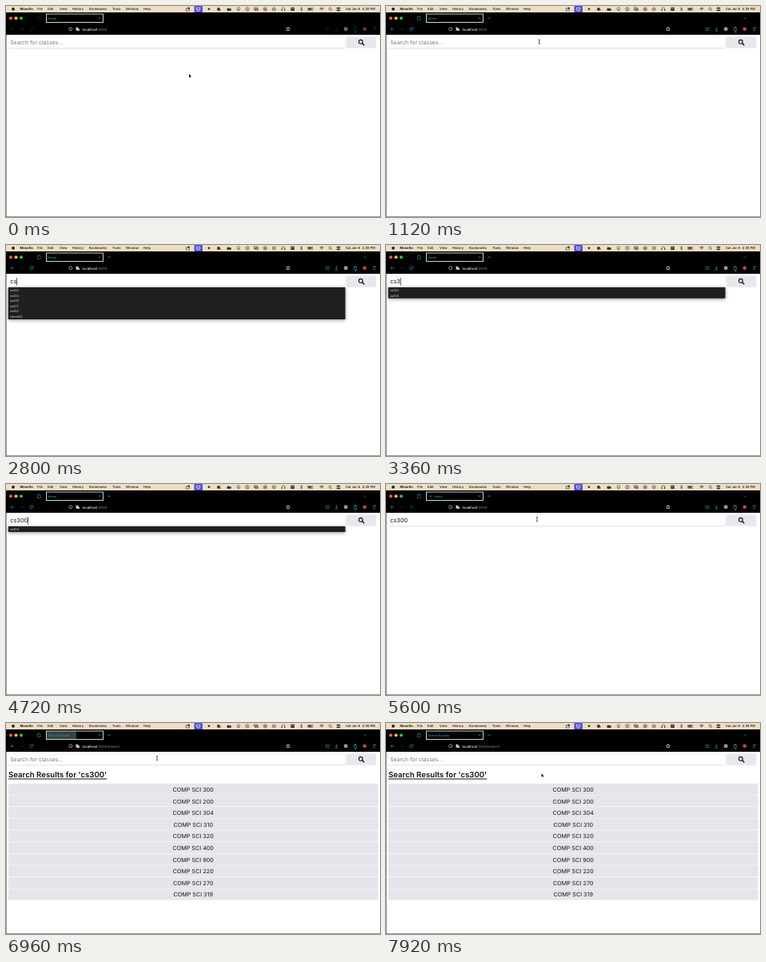
Recreate the animation shown at these times as an HTML page with a canvas. Size 468x264 px, loop 8000 ms.

```html
<!DOCTYPE html>
<html lang="en">
<head>
<meta charset="utf-8">
<title>Class search</title>
<style>
html, body { margin: 0; width: 100%; height: 100%; overflow: hidden; background: #fff; }
canvas { display: block; width: 468px; height: 264px; }
</style>
</head>
<body>
<canvas id="stage"></canvas>
<script>
const W = 468, H = 264, LOOP = 8000, STEP = 80;
const FONT = 'Inter, "Open Sans", sans-serif';
const canvas = document.getElementById('stage');
const scale = window.devicePixelRatio || 1;
canvas.width = W * scale;
canvas.height = H * scale;
const c = canvas.getContext('2d');
c.scale(scale, scale);
c.textRendering = 'geometricPrecision';

const MENUS = [['File', 39], ['Edit', 52], ['View', 67], ['History', 83], ['Bookmarks', 104],
  ['Tools', 133], ['Window', 150], ['Help', 172]];
const COURSES = [300, 200, 304, 310, 320, 400, 900, 220, 270, 319];
const HINTS = ['cs320', 'cs300', 'cs400', 'cs577', 'cs252', 'chem103'];
const QUERY = 'cs300';
const KEYS = [2400, 2800, 3280, 3760, 4000];
const CARET = [1280, 1840, 2400, 3040, 3280, 3600, 3760, 4160, 4720, 5280, 5840];
const ACTIVE = 720, SUBMIT = 5440, COMMIT = 6720, RESULTS = 6960;

// [time, x, y] of the pointer hot spot
const PATH = [[0, 229, 85], [80, 228, 83], [880, 197, 46], [1280, 189, 44], [4720, 189, 44],
  [5040, 190, 56], [5200, 190, 56], [5520, 189, 44], [7760, 189, 44], [7920, 194.6, 63.2], [8000, 194.6, 63.2]];

const passed = (list, t) => list.filter(v => t >= v).length;

function rect(x, y, w, h, fill, r = 0) {
  c.fillStyle = fill;
  c.beginPath();
  c.roundRect(x, y, w, h, r);
  c.fill();
}

function dot(x, y, r, fill) {
  c.fillStyle = fill;
  c.beginPath();
  c.arc(x, y, r, 0, Math.PI * 2);
  c.fill();
}

function ring(x, y, r, color, lw = 0.6) {
  c.strokeStyle = color;
  c.lineWidth = lw;
  c.beginPath();
  c.arc(x, y, r, 0, Math.PI * 2);
  c.stroke();
}

function line(color, lw, ...pts) {
  c.strokeStyle = color;
  c.lineWidth = lw;
  c.beginPath();
  for (let i = 0; i < pts.length; i += 2) c.lineTo(pts[i], pts[i + 1]);
  c.stroke();
}

function frame(x, y, w, h, color, lw = 0.6) {
  c.strokeStyle = color;
  c.lineWidth = lw;
  c.strokeRect(x, y, w, h);
}

function cross(x, y, r, color, lw = 0.6) {
  line(color, lw, x - r, y - r, x + r, y + r);
  line(color, lw, x + r, y - r, x - r, y + r);
}

function text(str, x, y, size, color, weight = 400, align = 'left') {
  c.font = `${weight} ${size}px ${FONT}`;
  c.fillStyle = color;
  c.textAlign = align;
  c.textBaseline = 'alphabetic';
  c.fillText(str, x, y);
  return c.measureText(str).width;
}

function menuBar() {
  const ink = '#3a3228';
  rect(0, 0, W, 8, '#eedec5');
  dot(9, 3.8, 1.9, '#1c1813');
  text('Mossfin', 17.5, 5.2, 4.1, '#1c1813', 700);
  MENUS.forEach(([name, x]) => text(name, x, 5.2, 4.1, '#1c1813', 500));

  rect(235.5, 0, 10.5, 8, '#5a4fd6', 1);
  frame(238.6, 2.2, 4.2, 2.8, '#fff');
  line('#fff', 0.6, 239.5, 6.2, 242, 6.2);

  frame(225.2, 3, 4, 3, ink);
  dot(228.6, 2.7, 1.3, ink);
  rect(252.6, 2.4, 2.8, 2.8, ink, 1.4);
  dot(266, 4, 2, ink);
  dot(268, 5, 1, '#c4553c');
  dot(278.2, 4.4, 1.8, ink);
  dot(280.4, 4.6, 1.5, ink);
  ring(291, 3.6, 1.8, ink);
  line(ink, 0.6, 291, 4, 291, 6.4);
  ring(302, 3.9, 2.2, ink);
  line(ink, 0.7, 302, 2.6, 302, 5.2);
  frame(310.6, 2, 3.6, 2.6, ink);
  frame(312, 3.2, 3.6, 2.6, ink);
  ring(324.3, 3.9, 2.2, ink);
  dot(324.3, 3.9, 1, ink);
  ring(335.3, 3.9, 2, ink);
  line(ink, 0.6, 333.6, 3.9, 337, 3.9);
  c.strokeStyle = ink;
  c.beginPath();
  c.arc(347, 4, 2, Math.PI, 0);
  c.stroke();
  rect(344.6, 4, 1.2, 2, ink);
  rect(348.2, 4, 1.2, 2, ink);
  rect(356.3, 1.8, 4.6, 4.2, ink, 0.6);
  line('#eedec5', 0.5, 357, 3.4, 360.2, 3.4);
  line(ink, 0.5, 368.2, 2.8, 371, 5, 369.6, 6.2, 369.6, 1.6, 371, 2.8, 368.2, 5);
  frame(377.8, 2.5, 6, 2.8, ink, 0.5);
  rect(378.3, 3, 4, 1.8, ink);
  c.lineWidth = 0.7;
  for (const r of [1.2, 2.4, 3.6]) {
    c.beginPath();
    c.arc(395, 5.8, r, -Math.PI * 0.75, -Math.PI * 0.25);
    c.stroke();
  }
  ring(405.5, 3.5, 1.5, ink);
  line(ink, 0.7, 406.6, 4.6, 408, 6);
  rect(413.6, 1.8, 4.8, 1.8, ink, 0.9);
  rect(413.6, 4.4, 4.8, 1.8, ink, 0.9);
  text('Sat Jan 6', 425, 5.2, 4.1, '#1c1813', 500);
  text('4:38 PM', 462, 5.2, 4.1, '#1c1813', 500, 'right');
}

function tabStrip(t) {
  const active = t >= ACTIVE;
  const teal = active ? '#1f8f8c' : '#0b2626';
  const loading = t >= SUBMIT && t < RESULTS;
  ['#ff5f57', '#febc2e', '#28c840'].forEach((color, i) => dot(6 + i * 6.5, 15.3, 2, color));

  frame(39.3, 13.8, 3.8, 3.6, teal);
  line(teal, 0.6, 40, 13.6, 41.2, 12.4, 42.4, 13.6);

  // a short flash sweeps the tab once loading ends
  const flash = (t - RESULTS) / 320;
  if (flash >= 0 && flash < 1) {
    c.globalAlpha = 0.55 * (1 - flash);
    rect(51, 10.5, Math.min(70, 37 + flash * 80), 9.5, '#68767b');
    c.globalAlpha = 1;
  }
  frame(50.5, 10, 71, 10.5, '#e4e8e8', 0.9);
  const title = t >= COMMIT ? 'Search Results' : 'Home';
  text(title, loading ? 60 : 52.5, 16.6, 3.75, '#259b9b', 500);
  if (loading) dot(54.6 + 1.6 * Math.cos((t - 5920) / 880 * Math.PI * 2 + Math.PI), 15.2, 0.8, '#55cfd0');
  cross(117, 15.2, 1, '#259b9b');
  line(teal, 0.6, 127, 15.2, 131, 15.2);
  line(teal, 0.5, 129, 14, 129, 16.4);
  line(teal, 0.6, 447.4, 14.5, 449, 16, 450.6, 14.5);
}

function toolBar(t) {
  const active = t >= ACTIVE;
  const teal = active ? '#1f8f8c' : '#0b2626';
  const dim = '#0c2929';
  line(teal, 0.7, 8, 27, 6, 29, 8, 31);
  line(teal, 0.7, 6, 29, 10.4, 29);
  line(dim, 0.7, 20, 27, 22, 29, 20, 31);
  line(dim, 0.7, 17.6, 29, 22, 29);
  if (t >= SUBMIT && t < RESULTS) cross(32, 29, 1.6, '#186765', 0.7);
  else {
    c.strokeStyle = teal;
    c.lineWidth = 0.8;
    c.beginPath();
    c.arc(31.8, 29, 1.9, 0.3, 5.4);
    c.stroke();
    line(teal, 0.8, 34, 26.6, 34, 28.2, 32.2, 28.2);
  }

  ring(80.8, 28.8, 2, '#d0d4d4', 0.7);
  rect(87.6, 26.8, 2.6, 4, '#cfd3d3', 0.4);
  rect(90, 28.6, 2, 2.4, '#cfd3d3', 0.4);
  const host = text('localhost', 95.5, 30.5, 4.35, '#f5f7f7', 500);
  text(':3000' + (t >= COMMIT ? '/search' : ''), 95.5 + host, 30.5, 4.35, '#8b9191');

  c.strokeStyle = '#e8ecec';
  c.lineWidth = 0.7;
  c.beginPath();
  for (let i = 0; i < 10; i++) {
    const a = i * Math.PI / 5 - Math.PI / 2, r = i % 2 ? 1.2 : 2.5;
    c.lineTo(353 + r * Math.cos(a), 28.9 + r * Math.sin(a));
  }
  c.closePath();
  c.stroke();

  frame(400, 27.2, 4.2, 3.4, teal);
  line(teal, 0.6, 401, 28.4, 402.1, 29.4, 403.2, 28.4);
  line(teal, 0.7, 413.5, 26.4, 413.5, 30);
  line(teal, 0.7, 412, 28.6, 413.5, 30, 415, 28.6);
  line(teal, 0.7, 411.5, 31.4, 415.5, 31.4);
  dot(425.2, 28.8, 2.5, active ? '#8f9696' : '#656a6a');
  frame(435.2, 27.4, 3.6, 3.4, teal);
  dot(437, 27, 0.9, teal);
  dot(437.5, 32.2, 0.8, active ? '#4cc9ca' : '#247777');
  dot(448.8, 28.8, 2.4, active ? '#b64b32' : '#7c2f20');
  for (let i = 0; i < 3; i++) line(teal, 0.6, 458.8, 27.4 + i * 1.6, 462.4, 27.4 + i * 1.6);
  dot(461.8, 27, 0.8, active ? '#3ea54c' : '#2a6532');
}

function searchBar(t) {
  c.save();
  c.shadowColor = 'rgba(0,0,0,.22)';
  c.shadowBlur = 1.5 * scale;
  c.shadowOffsetY = 0.4 * scale;
  rect(3, 39.3, 421.3, 13.3, '#fff', 1.6);
  c.restore();
  rect(425.8, 38.6, 37.6, 14.2, '#e8e7ed', 1.8);
  ring(443.9, 44.8, 2.4, '#111', 1.1);
  line('#111', 1.4, 445.7, 46.6, 448.3, 49.2);

  const typed = t < RESULTS ? QUERY.slice(0, passed(KEYS, t)) : '';
  let width = 0;
  if (typed) width = text(typed, 5.3, 48.4, 7.35, '#17171b');
  else text('Search for classes...', 5.2, 48.3, 6.9, '#76767b');
  if (t < RESULTS && passed(CARET, t) % 2) rect(5.3 + width, 41, 0.7, 9.4, '#111');
}

function hints(t) {
  // the list follows each key one step later
  const query = QUERY.slice(0, passed(KEYS, t - STEP));
  if (t < 2560 || t >= 5200) return;
  const rows = HINTS.filter(h => h.startsWith(query));
  c.save();
  c.shadowColor = 'rgba(0,0,0,.45)';
  c.shadowBlur = 4 * scale;
  c.shadowOffsetY = 1 * scale;
  rect(2.8, 53, 421.8, rows.length * 6.6 + 0.5, '#1f1f20', 0.6);
  c.restore();
  rows.forEach((h, i) => text(h, 5, 57.9 + i * 6.6, 3.7, '#e6e6e8'));
}

function results() {
  const width = text("Search Results for 'cs300'", 3, 68, 9.65, '#101014', 600);
  rect(3, 69.5, width, 0.9, '#101014');
  COURSES.forEach((n, i) => {
    const y = 75.7 + i * 14.62;
    rect(2.8, y, 463, 14.3, '#e6e5eb', 2);
    text('COMP SCI ' + n, 234.2, y + 10.2, 7.2, '#17171b', 400, 'center');
  });
}

function pointer(t) {
  if (t >= KEYS[0] && t < 4800) return;
  const i = Math.max(1, PATH.findIndex(p => p[0] > t));
  const [t0, x0, y0] = PATH[i - 1], [t1, x1, y1] = PATH[i];
  const k = (t - t0) / (t1 - t0), e = k * k * (3 - 2 * k);
  const x = x0 + (x1 - x0) * e, y = y0 + (y1 - y0) * e;
  if (y > 39 && y < 53) {
    line('#333', 0.8, x, y - 2.5, x, y + 2.5);
    for (const s of [-1, 1]) line('#333', 0.7, x - 1.2, y + s * 2.8, x, y + s * 2.2, x + 1.2, y + s * 2.8);
    return;
  }
  c.beginPath();
  [[0, 0], [0, 4.2], [0.9, 3.4], [1.6, 4.9], [2.3, 4.6], [1.7, 3.1], [2.9, 3]]
    .forEach(([dx, dy]) => c.lineTo(x + dx, y + dy));
  c.closePath();
  c.strokeStyle = '#fff';
  c.lineWidth = 0.8;
  c.stroke();
  c.fillStyle = '#000';
  c.fill();
}

function draw(t) {
  rect(0, 0, W, H, '#fff');
  rect(0, 8, W, 28, '#000');
  menuBar();
  tabStrip(t);
  toolBar(t);
  searchBar(t);
  hints(t);
  if (t >= RESULTS) results();
  rect(0, 36, 0.8, 228, '#85858a');
  rect(0, 263.2, W, 0.8, '#77777c');
  pointer(t);
}

const start = performance.now();
function tick() {
  const t = (performance.now() - start) % LOOP;
  draw(Math.floor(t / STEP) * STEP);
  requestAnimationFrame(tick);
}
tick();
</script>
</body>
</html>
```
